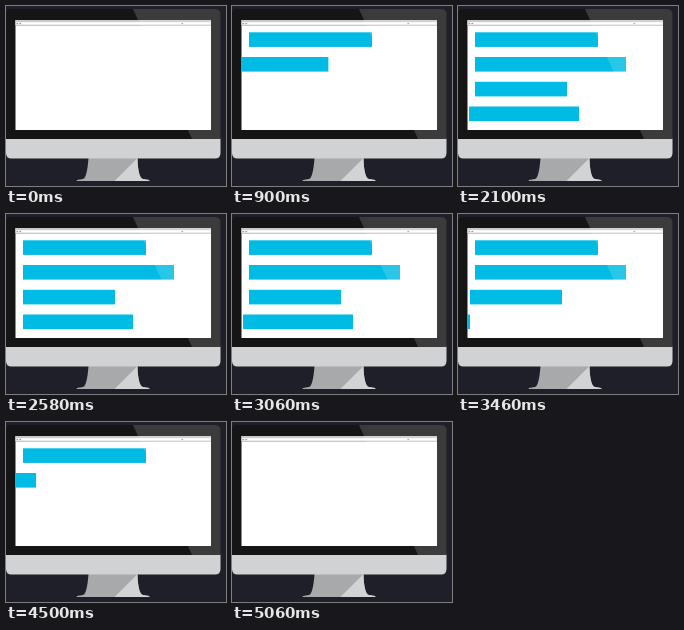
An HTML page that plays this animation: 220x180 px, repeating every 5.14 s.

```html
<!DOCTYPE html>
<html lang="en">
<head>
<meta charset="utf-8">
<title>Bars sliding across a monitor</title>
<style>
  html, body { margin: 0; height: 100%; overflow: hidden; background: #1f1f2a; }
  svg { display: block; width: 100vw; height: 100vh; }
</style>
</head>
<body>
<svg viewBox="0 0 220 180">
  <defs>
    <clipPath id="screen"><rect x="9.5" y="14" width="195.5" height="110"/></clipPath>
    <clipPath id="case"><path d="M0 133V8Q0 3 5 3H209Q214.5 3 214.5 8.500V133Z"/></clipPath>
  </defs>

  <!-- stand -->
  <path d="M82.500 152H131.500Q132 172 137 173L143 174Q144 174.500 143 175H71Q70 174.500 71 174L77 173Q81 172 82.500 152Z" fill="#a7a9ab"/>
  <path d="M131.500 152Q132 172 137 173L143 174Q144 174.500 143 175H108.500Z" fill="#d1d3d4"/>

  <!-- case and chin -->
  <path d="M0 132.500H214.500V147Q214.500 152.500 209 152.500H5.500Q0 152.500 0 147Z" fill="#d1d2d4"/>
  <g clip-path="url(#case)">
    <rect width="220" height="133" fill="#151515"/>
    <rect x="9.5" y="14" width="195.500" height="110" fill="#fff"/>
    <g clip-path="url(#screen)">
      <rect x="9" y="14" width="197" height="2" fill="#c9c9c9"/>
      <rect x="9" y="16" width="197" height="3" fill="#f1f1f1"/>
      <rect x="16" y="16.500" width="159" height="2" fill="#fff"/>
      <rect x="177.500" y="16.500" width="26" height="2" fill="#fff"/>
      <path d="M10.500 17.500H12M13.500 17.500H15M175.500 17.500H177" stroke="#999"/>
      <path d="M9 19.300H206" stroke="#aaa" stroke-width=".8"/>
      <g id="bars" fill="#00bbe4"></g>
    </g>
    <path d="M127 3H215V133H186Z" fill="#fff" fill-opacity=".16"/>
  </g>
</svg>
<script>
const LOOP = 5140, STEP = 80, FIRST = 100, TURN = 32, LEFT = 17;

// Start and end are counted in steps; the second half plays backwards.
const bars = [
  { y: 26.3, width: 123, start: 0, end: 7.4 },
  { y: 51, width: 151, start: 4.9, end: 16.05 },
  { y: 75.8, width: 92, start: 13.5, end: 22.2 },
  { y: 100.5, width: 110, start: 19.5, end: 27.05 }
];

for (const bar of bars) {
  bar.node = document.createElementNS("http://www.w3.org/2000/svg", "rect");
  bar.node.setAttribute("y", bar.y);
  bar.node.setAttribute("width", bar.width);
  bar.node.setAttribute("height", 14.6);
  document.getElementById("bars").append(bar.node);
}

const clamp = v => Math.min(1, Math.max(0, v));
const easeInOut = p => (1 - Math.cos(Math.PI * p)) / 2;

function draw(now) {
  const time = now % LOOP;
  const step = time < FIRST ? 0 : 1 + Math.floor((time - FIRST) / STEP);
  const pose = TURN - Math.abs(TURN - step);
  for (const { node, width, start, end } of bars) {
    const p = easeInOut(clamp((pose - start) / (end - start)));
    node.setAttribute("x", -width + p * (LEFT + width));
  }
}

const origin = performance.now();
function tick() {
  draw(performance.now() - origin);
  requestAnimationFrame(tick);
}
tick();
</script>
</body>
</html>
```
